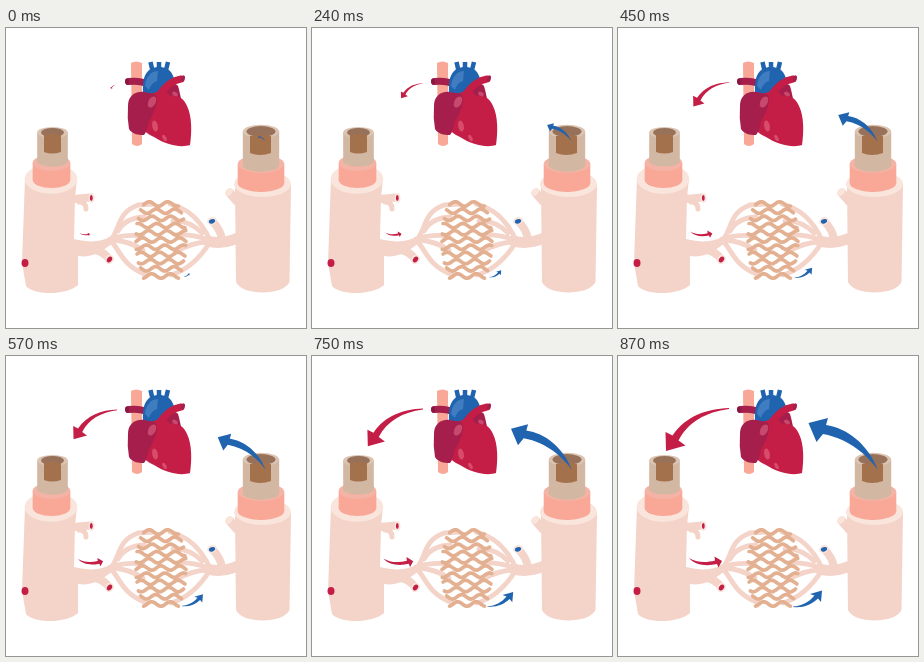
Write an HTML page with a canvas that moves like this. It is 300 px wide and 300 px high and loops after 900 ms.

```html
<!DOCTYPE html>
<html lang="en">
<head>
<meta charset="utf-8">
<title>Blood circulation</title>
<style>
html, body { margin: 0; width: 100%; height: 100%; overflow: hidden; background: #fff; }
canvas { display: block; width: 300px; height: 300px; }
</style>
</head>
<body>
<canvas id="stage" width="300" height="300"></canvas>
<script>
const ctx = document.getElementById('stage').getContext('2d');
const STEP = 30, STEPS = 30;
const SKIN = '#f4d3c9', RIM = '#f9e5dc', SALMON = '#f9a797', SALMON_LID = '#f4b3a5';
const TAN = '#d2b7a3', TAN_LID = '#dcc4b2', BROWN = '#a4714d', HOLE = '#97715a', MESH = '#e3b192';
const RED = '#c41e47', WINE = '#a61e4c', BLUE = '#2063ae', SKY = '#3f7cc0';

const arrows = [
  { color: RED, pivot: [111, 57], from: .1,
    path: 'M111 52C88 53 68 60 54.5 79.5L47.5 76L48 95L67.5 89.5L60.5 84.5C70 66 88 56 111 53Z' },
  { color: BLUE, pivot: [259, 113], from: .1,
    path: 'M260 114C250 100 232 83 205 78L198.5 86L190.5 67L210 62L208 69C229 72 250 88 260 114Z' },
  { color: RED, pivot: [75, 206.5], from: .31,
    path: 'M71 202C78 206.5 88 207 97 204.5L96.5 200.5L104 205L100.5 211.5L99 208C88 210.5 77 209 71 202Z' },
  { color: BLUE, pivot: [178.5, 248], from: .2,
    path: 'M175 250.5C184 250 191 246 196.5 239.5L192 238L204 234.5L203 246L200 242.5C193 249 185 252 175 251Z' }
].map(a => ({ ...a, shape: new Path2D(a.path) }));

function fill(color, d) {
  ctx.fillStyle = color;
  ctx.fill(new Path2D(d));
}

function line(color, width, d, cap = 'round') {
  ctx.strokeStyle = color;
  ctx.lineWidth = width;
  ctx.lineCap = cap;
  ctx.lineJoin = 'round';
  ctx.stroke(new Path2D(d));
}

function oval(color, x, y, rx, ry, turn = 0) {
  ctx.fillStyle = color;
  ctx.beginPath();
  ctx.ellipse(x, y, rx, ry, turn, 0, 7);
  ctx.fill();
}

function tube(color, x, top, bottom, rx, ry, lid = color) {
  ctx.fillStyle = color;
  ctx.fillRect(x - rx, top, 2 * rx, bottom - top);
  oval(color, x, bottom, rx, ry);
  oval(lid, x, top, rx, ry);
}

function leftVessel() {
  line(SKIN, 8, 'M68 171L84 169.5');
  line(SKIN, 5, 'M73 174Q80 174 80 181');
  oval(RIM, 85.5, 170, 3, 5);
  oval(RED, 85.3, 170, 1.4, 3);
  fill(SKIN, 'M19 150L16 235L20 258C28 268 62 267 72 257L72 228C84 230 94 225 107 215L106 208C96 214 84 215 68 211L69 170L71 150Z');
  line(SKIN, 8, 'M89 222Q98 224 103 231');
  oval(RIM, 103.5, 231.5, 4.2, 4.8, .6);
  oval(RED, 103.5, 231.5, 2.4, 3.2, .6);
  oval(RED, 19, 235, 3.5, 4);
  oval(RIM, 45, 151, 26.3, 15);
  tube(SALMON, 45.5, 135, 152, 18.8, 8, SALMON_LID);
  tube(TAN, 46.5, 104.5, 133, 15.3, 5.5, TAN_LID);
  oval(HOLE, 46.5, 104.5, 11.5, 4.6);
  fill(BROWN, 'M38 107Q46 105 55 107L55 124Q46 127 38 124Z');
}

function rightVessel() {
  line(SKIN, 9, 'M231 173L224 165');
  oval(RIM, 223, 164, 3, 4.5, .8);
  fill(SKIN, 'M229 157L230 254C236 268 277 268 283.5 254L285 157Z');
  oval(RIM, 256.5, 156, 28.5, 13);
  tube(SALMON, 255, 136, 155, 23.3, 9, SALMON_LID);
  tube(TAN, 255, 103.5, 137, 18.2, 6.8, TAN_LID);
  oval(HOLE, 255, 103.5, 14.5, 5.4);
  fill(BROWN, 'M244 108Q254 106 265 108L265 125Q254 129 244 125Z');
}

function capillaries() {
  line(SKIN, 4.8, 'M105 212C114 200 112 184 132 177L147 176M112 203Q119 190 138 189M104 211Q119 206 137 208M107 212Q123 213 137 222M105 213C114 222 116 238 141 247');
  line(SKIN, 4.8, 'M204 212Q190 182 164 176M196 205Q183 192 167 193M202 212Q188 206 170 207M202 214Q187 214 169 224M204 214Q188 240 165 247');
  line(SKIN, 11, 'M202 213Q215 217 232 210');
  line(SKIN, 8, 'M216 211Q214 201 207 194');
  oval(RIM, 206, 193, 5, 3.8, -.3);
  oval(BLUE, 206, 193.3, 3.2, 2.2, -.3);

  // Neighbouring waves run out of phase and meet, leaving leaf-shaped gaps.
  let mesh = '';
  for (let row = 0; row < 11; row++) {
    const y = 176 + row * 7.2;
    const reach = 25 * Math.sqrt(1 - ((y - 212) / 50) ** 2);
    const phase = row * Math.PI + Math.sin(row * 2.3);
    for (let i = 0; i <= 20; i++) {
      const x = 155 + reach * (i / 10 - 1);
      mesh += (i ? 'L' : 'M') + x + ' ' + (y + 2.3 * Math.sin(x * .34 + phase));
    }
  }
  line(MESH, 3.7, mesh);
}

function heart() {
  fill(SALMON, 'M125 35Q130 32 136 35L136 116Q131 120 126 116Z');
  line(WINE, 7, 'M122.5 53.5Q134 52 144 57');
  oval('#87173e', 121, 53.5, 1.8, 3);
  line(BLUE, 4.5, 'M144.5 34L147 45M153 34L153 44M162 34L159 46', 'butt');
  fill(BLUE, 'M137 64C136 48 141 39 153 39C165 39 171 48 168 67L150 70Z');
  fill(SKY, 'M139 58C140 49 145 43 152 43L151 53Q145 55 143 62Z');
  fill(WINE, 'M152 70C154 58 168 52 172 58C174 64 174 68 176 74L160 80Z');
  fill(RED, 'M136 70C146 64 152 65 158 60L164 68C172 66 178 71 181 78C186 88 186 104 184 117C175 120 160 117 148 109C141 106 136 102 135 94Z');
  fill(WINE, 'M122 78C122 68 129 63 138 64L149 66C154 72 149 82 145 90C141 96 142 103 138 107C132 107 126 106 123 101Q121 90 122 78Z');
  line(RED, 7, 'M154 66Q163 53 175 51');
  oval(WINE, 177, 50.5, 1.8, 3.2, .3);
  oval('#c7496d', 146, 74, 3.6, 6, .5);
  oval('#d74b6b', 149, 98, 2.8, 5.5, -.2);
  oval('#d74b6b', 158.5, 110, 1.8, 3.5, -.5);
  oval('#c7496d', 169, 66, 3, 2, .5);
}

function drawArrow({ color, pivot: [x, y], from, shape }, progress) {
  const size = from + (1 - from) * progress;
  ctx.save();
  ctx.translate(x, y);
  ctx.scale(size, size);
  ctx.translate(-x, -y);
  ctx.fillStyle = color;
  ctx.fill(shape);
  ctx.restore();
}

function render(now) {
  const progress = Math.floor(now / STEP) % STEPS / (STEPS - 1);
  ctx.fillStyle = '#fff';
  ctx.fillRect(0, 0, 300, 300);
  capillaries();
  leftVessel();
  rightVessel();
  heart();
  for (const arrow of arrows) drawArrow(arrow, progress);
  requestAnimationFrame(render);
}

render(performance.now());
</script>
</body>
</html>
```
